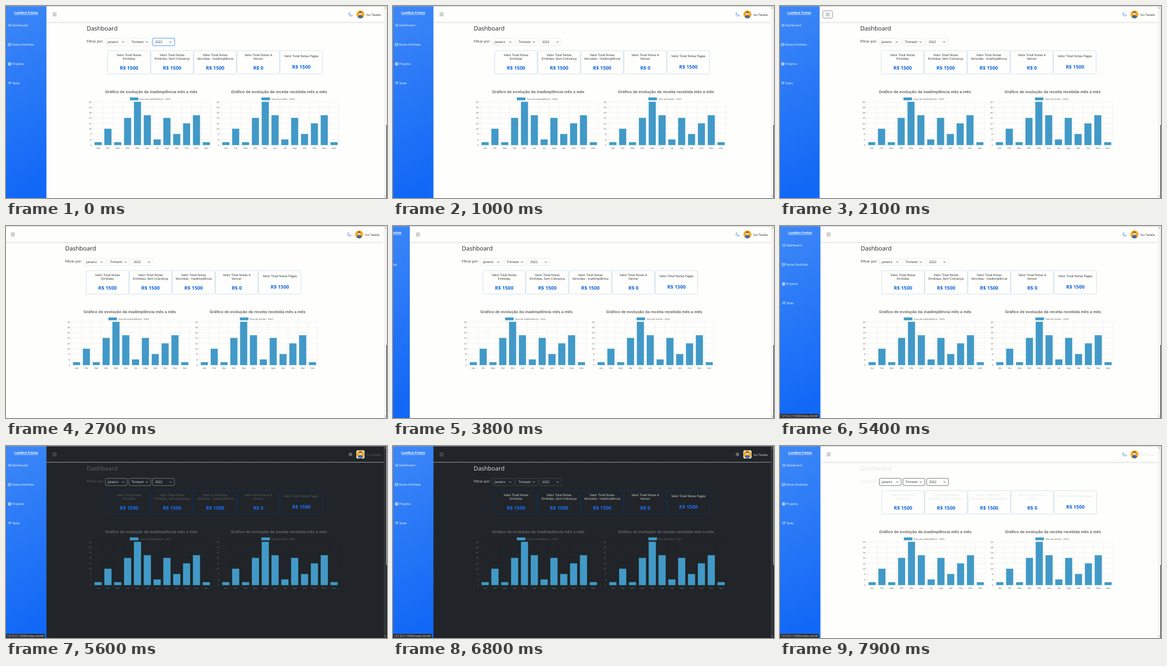
An HTML page for the animation above (8000 ms loop, 730x368 px).

```html
<!DOCTYPE html>
<html lang="pt-BR">
<head>
<meta charset="utf-8">
<title>Dashboard</title>
<style>
@property --m { syntax: "<number>"; inherits: true; initial-value: 0; }
@property --ink { syntax: "<color>"; inherits: true; initial-value: #212529; }
@property --edge { syntax: "<color>"; inherits: true; initial-value: #e3e6e9; }

html, body { margin: 0; width: 100%; height: 100%; overflow: hidden; }
svg {
  --bg: #fefefc; --line: #dcdfe1; --card: #c3d9f2; --value: #1267dd; --field: #212529;
  --rail: #f4f4f2; --arrow: #8a8a8a; --sun: 0; --moon: 1;
  display: block; width: 730px; height: 368px; background: var(--bg);
  font: 6px "Open Sans", "Noto Sans", sans-serif;
  text-rendering: geometricPrecision;
  animation: slide 8s linear infinite, theme 8s step-end infinite, ink 8s linear infinite;
}
text { white-space: pre; }

.side, .bar { transform: translateX(calc(var(--m) * -1px)); }
.user { transform: translateX(calc(-1px * max(0, var(--m) - 77.5))); }
.main { transform: translateX(calc(-.5px * (var(--m) + max(0, var(--m) - 77.5)))); }

.side { fill: #fff; }
.icon { fill: none; stroke: #fff; stroke-width: .7; }
.brand { font-size: 6.3px; font-weight: 700; text-decoration: underline; }
.ink { fill: var(--ink); }
.mid { text-anchor: middle; }
.med { font-weight: 500; }
.h1 { font-size: 11.5px; }
.label { font-size: 6.6px; }
.field { fill: var(--bg); stroke: var(--edge); stroke-width: .8; }
.choice { fill: var(--field); font-size: 6.2px; }
.chev { fill: none; stroke: var(--field); stroke-width: .8; }
.card { fill: none; stroke: var(--card); stroke-width: .8; }
.value { fill: var(--value); font-size: 9.4px; font-weight: 700; }
.chart { font: 4.55px "Liberation Sans", Arial, sans-serif; fill: #666; }
.chart .title { font-size: 7.58px; font-weight: 700; }
.grid { stroke: rgba(0, 0, 0, .09); stroke-width: .6; fill: none; }
.blue { fill: #4299c8; stroke: #3ba5bd; stroke-width: .5; }
.end { text-anchor: end; }

.ring { animation: ring 8s linear infinite; }
.hover { animation: hover 8s linear infinite; }
.status { animation: status 8s step-end infinite; }
.moon { opacity: var(--moon); }
.sun { opacity: var(--sun); }

@keyframes slide {
  0% { --m: 0; }
  26% { --m: 0; animation-timing-function: ease; }
  33.5% { --m: 80; }
  45.55% { --m: 80; animation-timing-function: ease; }
  53.05%, 100% { --m: 0; }
}
@keyframes theme {
  68.75% {
    --bg: #212529; --line: #a4a9ad; --card: #0b3266; --value: #1a6ffb; --field: #e4e7ea;
    --rail: #33373a; --arrow: #9a9a9a; --sun: 1; --moon: 0;
  }
  98.75%, 100% {
    --bg: #fefefc; --line: #dcdfe1; --card: #c3d9f2; --value: #1267dd; --field: #212529;
    --rail: #f4f4f2; --arrow: #8a8a8a; --sun: 0; --moon: 1;
  }
}
@keyframes ink {
  0%, 68.75% { --ink: #212529; --edge: #e3e6e9; }
  71% { --edge: #495057; }
  72.5%, 100% { --ink: #dee2e6; --edge: #495057; }
}
@keyframes ring { 0%, 1.25% { opacity: 1; } 3.5%, 100% { opacity: 0; } }
@keyframes hover { 0%, 23.5% { opacity: 0; } 24.5%, 27% { opacity: 1; } 29%, 100% { opacity: 0; } }
@keyframes status { 0% { opacity: 0; } 66.25%, 100% { opacity: 1; } }
</style>
</head>
<body>
<svg viewBox="0 0 730 368">
  <defs>
    <linearGradient id="sky" x2=".12" y2="1">
      <stop stop-color="#3e88f7"/><stop offset="1" stop-color="#1268f6"/>
    </linearGradient>
    <linearGradient id="shade" x2="0" y2="1">
      <stop stop-color="#000" stop-opacity=".06"/><stop offset="1" stop-color="#000" stop-opacity="0"/>
    </linearGradient>
  </defs>

  <g class="bar">
    <rect x="77.5" y="31.5" width="724" height="3" fill="url(#shade)"/>
    <path d="M77.5 31.2h724" stroke="var(--line)"/>
    <rect class="hover" x="83.7" y="9.2" width="18.6" height="14" rx="2.2" fill="none" stroke="#7b8085" stroke-width=".9"/>
    <path d="M89.3 13.6h7.6m-7.6 2.6h7.6m-7.6 2.6h7.6" stroke="#7a7d80" stroke-width=".9"/>
  </g>

  <g class="main" id="main">
    <text class="ink med h1" x="154.5" y="46.6">Dashboard</text>
    <text class="ink med label" x="154.5" y="69.8">Filtrar por:</text>
  </g>

  <g class="user">
    <path class="moon" d="M658.7 12.5A3.8 3.8 0 1 0 664 17.6 4 4 0 0 1 658.7 12.5z" fill="none" stroke="#3d86e8" stroke-width=".8"/>
    <g class="sun" fill="none" stroke="#dee2e6" stroke-width=".8">
      <circle cx="660" cy="16" r="1.9"/>
      <path d="M660 12.3v1m0 5.4v1m-3.7-3.7h1m5.4 0h1m-6.3-2.6.7.7m3.8 3.8.7.7m-5.2 0 .7-.7m3.8-3.8.7-.7"/>
    </g>
    <rect x="671.3" y="8.3" width="15.6" height="15.6" rx="3" fill="#fefefc"/>
    <circle cx="679.1" cy="16.1" r="7.7" fill="#f6a821"/>
    <path d="M674.4 21.8c0-3.4 2-4.4 4.7-4.4s4.7 1 4.7 4.4a7.6 7.6 0 0 1-9.4 0z" fill="#3d6f9c"/>
    <circle cx="679.1" cy="14.4" r="2.7" fill="#f6d3ac"/>
    <path d="M676.2 14c0-4.6 5.8-4.6 5.8 0-1-1.6-4.8-1.6-5.8 0z" fill="#5a4334"/>
    <text class="ink" x="690.5" y="18.7">Ivo Tavela</text>
  </g>

  <g class="side">
    <rect x="-2" width="79.5" height="368" fill="url(#sky)"/>
    <text class="brand mid" x="38.5" y="15.2">Lumbra Fretes</text>
    <g class="icon">
      <path id="list" d="M4 35.2h1m.8 0h4M4 37h1m.8 0h4M4 38.8h1m.8 0h4"/>
      <use href="#list" y="110.4"/>
      <path d="M4.2 71.6h5v4.6h-5zm0 3.6 1.7-1.6 1.2 1 2-2"/>
      <path d="M4.6 108.4h4.6v5.2H4.6zm0 1.8h4.6m-4.6 1.8h4.6m-2.3-3.6v5.2"/>
    </g>
    <g id="menu"></g>
  </g>

  <g class="status">
    <path d="M0 360h72.5q2 0 2 2v6H0z" fill="#2b2f33"/>
    <text x="2" y="366.1" font-size="5.5" fill="#e8eaed">127.0.0.1:5500/index.html#</text>
  </g>

  <rect x="724" width="6" height="368" fill="var(--rail)"/>
  <path d="M725 4.5 726.5 2.5 728 4.5zm0 359.2 1.5 2 1.5-2z" fill="var(--arrow)"/>
  <path d="M729.5 0v228" stroke="#e2e2e0"/>
  <path d="M729.5 228v140" stroke="#111"/>
  <path d="M0 .3h730" stroke="#a9a9a9" stroke-width=".8"/>
</svg>
<script>
const $ = id => document.getElementById(id);
const text = (cls, x, y, s) => `<text class="${cls}" x="${x}" y="${y}">${s}</text>`;

const field = (s, i) => {
  const x = 190.4 + i * 45.3;
  const ring = i < 2 ? '' : `<g class="ring" fill="none">
    <rect x="${x - .7}" y="61.3" width="43.2" height="15.2" rx="2.8" stroke="#c5dcfb" stroke-width="1.6"/>
    <rect x="${x}" y="62" width="41.8" height="13.8" rx="2.2" stroke="#79aef5"/></g>`;
  return `<rect class="field" x="${x}" y="62" width="41.8" height="13.8" rx="2.2"/>${ring}` +
    text('choice', x + 4.7, 71.2, s) +
    `<path class="chev" d="M${x + 32.2} 68l2 2 2-2"/>`;
};

const card = ([lines, value], i) => {
  const x = 195 + i * 82.55, mid = x + 40.7, single = lines.length < 2;
  return `<rect class="card" x="${x}" y="85.6" width="81.2" height="44.9" rx="2"/>` +
    lines.map((s, n) => text('ink med mid', mid, (single ? 98.3 : 96.2) + n * 7.2, s)).join('') +
    text('value mid', mid, single ? 120.1 : 121.6, value);
};

const months = 'Jan Fer Mar Abr Mai Jun Jul Ago Set Out Nov Dez'.split(' ');
const data = [5, 10, 5, 14, 20, 15, 6, 14, 8, 12, 15, 5];
const step = 18.84, left = 167.1, base = 266.3;
const yOf = v => base - (v - 4) * 5.15;

const chart = (name, legend, dx, lx) => {
  let grid = '', labels = '', bars = '';
  for (let v = 4; v <= 20; v += 2) {
    grid += `M${left - 3} ${yOf(v)}h${12 * step + 3}`;
    labels += text('end', left - 3.3, yOf(v) + 1.6, v);
  }
  for (let i = 0; i <= 12; i++) grid += `M${left + i * step} ${yOf(20)}V${base + 3}`;
  data.forEach((v, i) => {
    const mid = left + (i + .5) * step;
    bars += `<rect class="blue" x="${mid - 6.6}" y="${yOf(v)}" width="13.2" height="${base - yOf(v)}"/>`;
    labels += text('mid', mid, 273.8, months[i]);
  });
  return `<g class="chart" transform="translate(${dx})">` +
    text('title mid', 278.4, 166.6, name) +
    `<rect class="blue" x="${lx}" y="175.6" width="15.8" height="4.8"/>` +
    text('', lx + 18.4, 179.5, legend) +
    `<path class="grid" d="${grid}"/>${bars}${labels}</g>`;
};

$('menu').innerHTML = ['Dashboard', 'Notas Emitidas', 'Projetos', 'Tasks']
  .map((s, i) => text('', 11.4, 39.2 + i * 36.8, s)).join('');

$('main').innerHTML += ['Janeiro', 'Trimestr', '2022'].map(field).join('') + [
  [['Valor Total Notas', 'Emitidas'], 'R$ 1500'],
  [['Valor Total Notas', 'Emitidas, Sem Cobrança'], 'R$ 1500'],
  [['Valor Total Notas', 'Vencidas - Inadimplência'], 'R$ 1500'],
  [['Valor Total Notas A', 'Vencer'], 'R$ 0'],
  [['Valor Total Notas Pagas'], 'R$ 1500']
].map(card).join('') +
  chart('Gráfico de evolução da inadimplência mês a mês', 'Taxa de inadimplência - 2023', 0, 237.7) +
  chart('Gráfico de evolução da receita recebida mês a mês', 'Taxa de receita - 2023', 244.8, 244.8);
</script>
</body>
</html>
```
